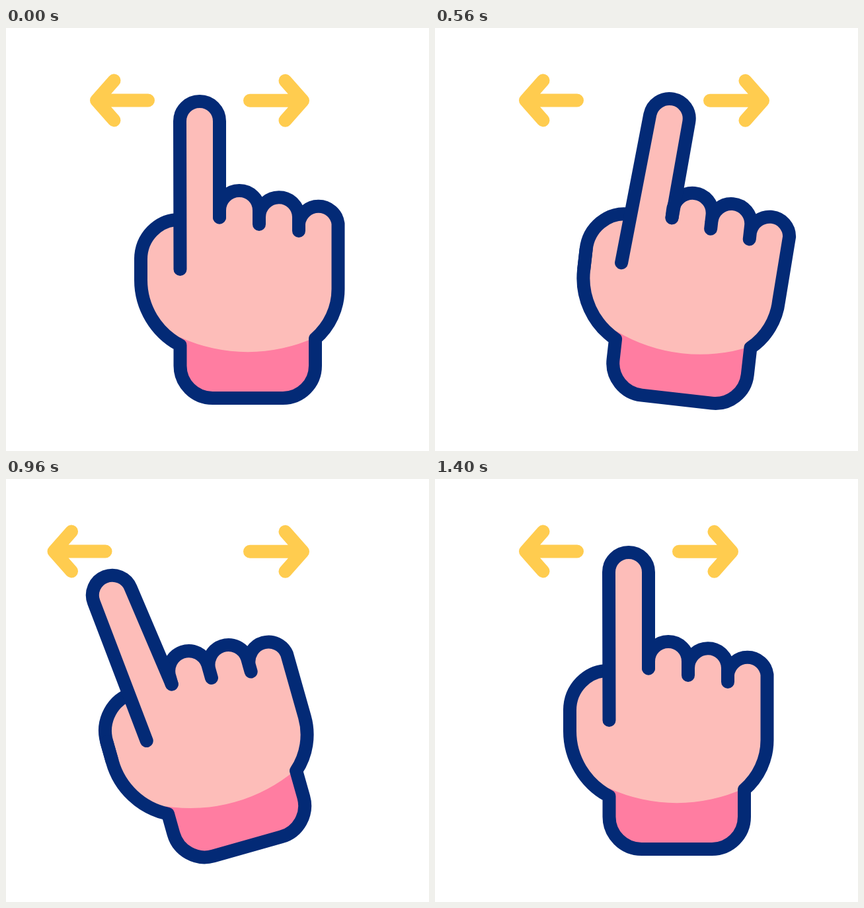
Animation, 640 px wide and 640 px high, one loop 1480 ms. Source, as an HTML page:

```html
<!DOCTYPE html>
<html lang="en">
<head>
<meta charset="utf-8">
<title>Swipe gesture</title>
<style>
  html, body { margin: 0; width: 100%; height: 100%; overflow: hidden; background: #fff; }
  svg { display: block; width: 100%; height: 100%; }
  .line { fill: none; stroke: #032a76; stroke-width: 20; stroke-linecap: round; stroke-linejoin: round; }
  .arrow { fill: none; stroke: #ffcc4f; stroke-width: 20; stroke-linecap: round; stroke-linejoin: round; }
</style>
</head>
<body>
<svg viewBox="0 0 640 640">
  <path id="left" class="arrow" d="M215 109.5H137M163.5 79.5L137 109.5L163.5 139.5"/>
  <path id="right" class="arrow" d="M369 109.8H449M422.5 79.8L449 109.8L422.5 139.8"/>
  <g id="hand">
    <path id="skin" fill="#fdbdb9"/>
    <path fill="#ff7da1" d="M263.5 468A247 247 0 0 0 468 468V511A49 49 0 0 1 419 560H312.5A49 49 0 0 1 263.5 511Z"/>
    <path class="line" style="stroke-linecap:butt" d="M262 290A58 60 0 0 0 204 350V381"/>
    <path id="palm" class="line"/>
    <path id="finger" class="line"/>
  </g>
</svg>
<script>
const LOOP = 1480, STEP = 40;
const $ = id => document.getElementById(id);
const clamp = x => Math.min(1, Math.max(0, x));

// Cubic Bezier easing with flat ends: handles at (a, 0) and (b, 1).
function ease(x, a = 1 / 3, b = 2 / 3) {
  x = clamp(x);
  let lo = 0, hi = 1;
  for (let i = 0; i < 30; i++) {
    const u = (lo + hi) / 2, v = 1 - u;
    if (3 * u * v * v * a + 3 * u * u * v * b + u * u * u < x) lo = u; else hi = u;
  }
  return lo * lo * (3 - 2 * lo);
}

const span = (k, from, to) => ease((k - from) / (to - from));
const settle = k => 1 - ease((k - 22) / 13, 0.37, 0.43);
const pt = p => p[0].toFixed(2) + ' ' + p[1].toFixed(2);

// Each joint: rest position, shift when leaning right, shift when leaning left.
const joints = {
  base: [[263.5, 365], [-4.8, -0.7], [-1, -0.4]],
  tip: [[293, 141], [22, -2], [-21.9, -3]],
  k1: [[323, 286.5], [5.9, 0.5], [-0.6, 6.5]],
  k2: [[383, 297], [5.9, 0.5], [0, 3]],
  k3: [[443, 307], [5.9, 0], [0, 0]],
  side: [[502.5, 296], [6, 0.5], [0, 0]]
};

function drawHand(r, l) {
  const at = name => {
    const [p, a, b] = joints[name];
    return [0, 1].map(i => p[i] + a[i] * r + b[i] * l);
  };
  const up = (p, d) => [p[0], p[1] - d];
  const [base, tip, k1, k2, k3, side] = ['base', 'tip', 'k1', 'k2', 'k3', 'side'].map(at);
  const tilt = (6.6 * r - 6.4 * l) * Math.PI / 180;
  const cx = 30 * Math.cos(tilt), cy = 30 * Math.sin(tilt);
  const arc = p => 'A30 30 0 0 1 ' + pt(p);

  const finger = 'L' + pt([tip[0] - cx, tip[1] - cy]) + arc([tip[0] + cx, tip[1] + cy]) + 'L' + pt(k1);
  const knuckle = (a, b) => 'L' + pt(up(a, 10.5)) + arc(up(b, 21)) + 'L' + pt(b);
  const knuckles = knuckle(k1, k2) + knuckle(k2, k3) + 'L' + pt(up(k3, 11)) + arc(side);
  const wrist = 'L502.5 395A99 99 0 0 1 468 470V511A49 49 0 0 1 419 560H312.5A49 49 0 0 1 263.5 511' +
    'V480A111.7 111.7 0 0 1 204 381V350';

  $('finger').setAttribute('d', 'M' + pt(base) + finger);
  $('palm').setAttribute('d', 'M' + pt(k1) + knuckles + wrist);
  $('skin').setAttribute('d', 'M' + pt(base) + finger + knuckles + wrist + 'A58 60 0 0 1 262 290Z');
  $('hand').setAttribute('transform', `rotate(${11.7 * r - 16.9 * l} 351 560)`);
}

function draw(ms) {
  const k = Math.floor((ms % LOOP) / STEP);
  const swing = span(k, 11, 22);
  const r = k < 11 ? span(k, 2, 11) : 1 - swing;
  const l = k < 22 ? swing : settle(k);
  drawHand(r, l);

  const out = k < 11 ? span(k, 2, 11) : 1 - span(k, 11, 18);
  const back = k < 22 ? span(k, 16, 22) : settle(k);
  $('right').setAttribute('transform', `translate(${77.5 * out} 0)`);
  $('left').setAttribute('transform', `translate(${-69 * back} 0)`);
}

let start = null;
function tick(now) {
  if (start === null) start = now;
  draw(Math.max(0, now - start));
  requestAnimationFrame(tick);
}
draw(0);
requestAnimationFrame(tick);
</script>
</body>
</html>
```
